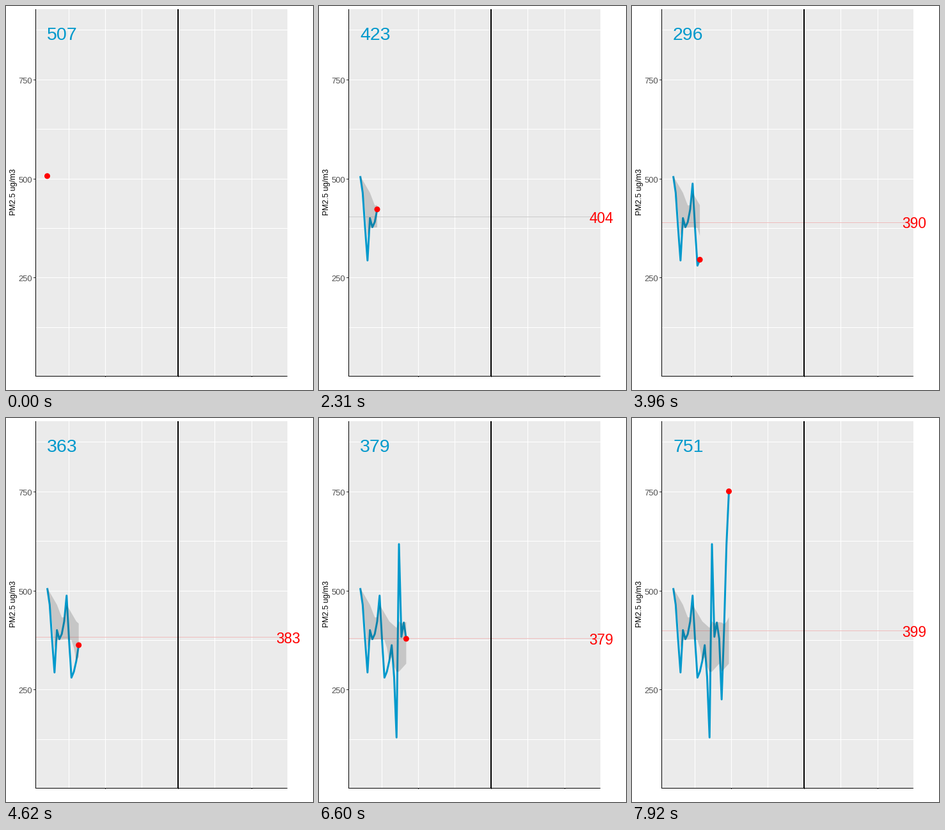
Write a matplotlib script that moves like this. It is 480x600 px and loops after 8 s.

```python
import numpy as np
import matplotlib.pyplot as plt
from matplotlib.animation import FuncAnimation
from matplotlib.patches import Circle, Polygon, Rectangle

W, H, DPI = 480, 600, 80
LOOP, STEP, HOLD = 8000, 20, 330
PT = 72 / DPI
BLUE, RED = "#0099CC", "#FF0000"
LEFT, TOP, RIGHT, BOTTOM = 47, 5, 440, 579

plt.rcParams["font.family"] = "Liberation Sans"

# Daily readings with their running mean and quartiles
pm = np.array([507, 465, 376, 294, 401, 378, 391, 423, 488, 376, 281, 296,
               323, 363, 282, 130, 618, 384, 420, 379, 226, 403, 617, 751])
days = np.arange(len(pm))
mean = np.array([pm[:n + 1].mean() for n in days])
low, high = np.array([np.quantile(pm[:n + 1], [0.25, 0.75]) for n in days]).T


def px(day):
    return 64.5 + 3.783 * day


def py(value):
    return 579.7 - 0.6193 * value


fig = plt.figure(figsize=(W / DPI, H / DPI), dpi=DPI, facecolor="white")
ax = fig.add_axes([0, 0, 1, 1])
ax.set(xlim=(0, W), ylim=(H, 0))
ax.axis("off")


def box(x0, y0, x1, y1, color, z):
    r = Rectangle((x0, y0), x1 - x0, y1 - y0, fc=color, lw=0,
                  antialiased=False, zorder=z)
    return ax.add_patch(r)


def text(x, y, s, size, color, **kw):
    return ax.text(x, y, s, fontsize=size * PT, color=color, zorder=9, **kw)


box(LEFT, TOP, RIGHT, BOTTOM, "#EBEBEB", 0)
for v in range(125, 876, 125):
    y = int(py(v))
    box(LEFT, y, RIGHT, y + 1, "white", 1)
    if v % 250 == 0:
        box(43, y, 46, y + 1, "#333333", 1)
        text(41.3, y + 6, str(v), 13, "#4D4D4D", ha="right")
for x in (98, 155, 212, 326, 384):
    box(x, TOP, x + 1, BOTTOM, "white", 1)
for x in (155, 269, 384):
    box(x, BOTTOM, x + 1, BOTTOM + 1, "#333333", 1)
box(268, TOP, 270, BOTTOM, "black", 3)
box(46, TOP, 47, BOTTOM, "black", 3)
box(46, 578, RIGHT, BOTTOM, "black", 3)
text(12.5, 290.5, "PM2.5 ug/m3", 12.2, "black",
     rotation=90, ha="center", va="center")

mean_line = box(LEFT, 0, RIGHT, 1, "#CACACA", 2)
line, = ax.plot([], [], color=BLUE, lw=3 * PT, zorder=4,
                solid_capstyle="butt", solid_joinstyle="round")
ribbon = ax.add_patch(Polygon([(0, 0), (0, 0)], fc="#333333", alpha=0.2,
                              lw=0, zorder=5))
dot = ax.add_patch(Circle((0, 0), 4.5, fc=RED, lw=0, zorder=6))
reading = text(64, 53, "", 28.45, BLUE)
average = text(441, 0, "", 22.76, RED, ha="center")


def day_at(k):
    """Whole days, with one half-day stop between days 9 and 10."""
    return k if k < 10 else 9.5 if k == 10 else k - 1


def draw(i):
    k = (i * STEP + STEP // 2) // HOLD
    day = day_at(k)
    seen = np.unique(np.append(days[days <= day], day))
    x = px(seen)

    def track(series):
        return py(np.interp(seen, days, series))

    y = track(pm)
    line.set_data(x, y)
    ribbon.set_xy(np.column_stack([np.append(x, x[::-1]),
                                   np.append(track(high), track(low)[::-1])]))
    dot.center = x[-1], y[-1]
    reading.set_text(f"{np.interp(day, days, pm):g}")

    avg = round(float(np.interp(day, days, mean)))
    mean_line.set_y(int(py(avg)))
    mean_line.set_facecolor("#CACACA" if k < 12 else "#EFBCBC")
    average.set_text(str(avg))
    average.set_y(py(avg) + 9)
    for art in (mean_line, average):
        art.set_visible(k > 0)
    return line, ribbon, dot, reading, mean_line, average


anim = FuncAnimation(fig, draw, frames=LOOP // STEP, interval=STEP,
                     init_func=lambda: draw(0), repeat=True, repeat_delay=0)
plt.show()
```
